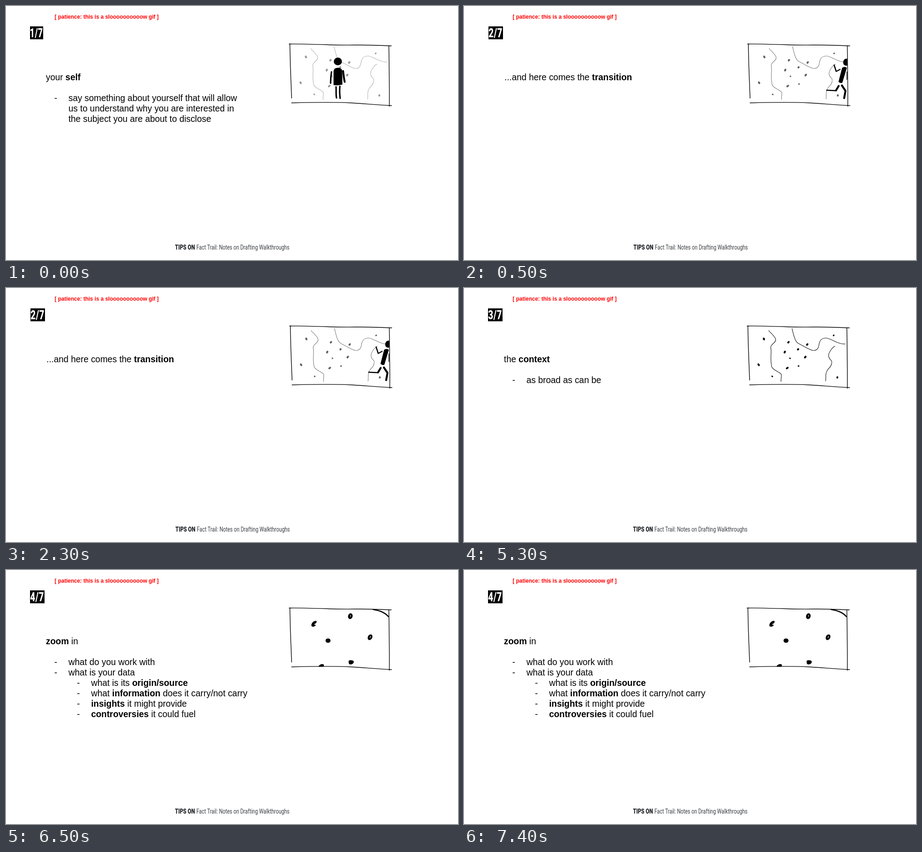
Recreate the animation shown at these times as an HTML page. Size 997 by 561 pixels, loop 8000 ms.

```html
<!DOCTYPE html>
<html lang="en">
<head>
<meta charset="utf-8">
<title>Presentation steps</title>
<style>
  html, body { margin: 0; width: 100%; height: 100%; overflow: hidden; background: #fff; }
  svg { display: block; width: 997px; height: 561px; }
  text { font: 19.4px "Liberation Sans", Arial, sans-serif; fill: #000; white-space: pre; }
  .b { font-weight: 700; }
  .note { font-size: 12px; font-weight: 700; fill: #f00; }
  .badge { font: 800 27.5px Roboto, sans-serif; letter-spacing: .8px; fill: #fff; }
  .foot { font: 400 15px Roboto, sans-serif; fill: #3a3e42; }
  .foot.b { font-weight: 800; fill: #1c2024; }
  .ink { fill: none; stroke: #000; stroke-width: 1.4; stroke-linecap: round; stroke-linejoin: round; }
  .w2 { stroke-width: 2.5; }
  .w3 { stroke-width: 3.2; }
  .w4 { stroke-width: 4.2; }
  .land { fill: none; stroke: var(--line); stroke-width: 1.2; stroke-linecap: round; stroke-linejoin: round; }
  .dots { fill: none; stroke: var(--dot); stroke-width: 4; stroke-linecap: round; }
  .dots .small { stroke-width: 3; }
  .slide { opacity: 0; animation: 8s step-end infinite; }
  #self { animation-name: self; --line: #b8b8b8; --dot: #979797; }
  #transition { animation-name: transition; --line: #858585; --dot: #606060; }
  #context { animation-name: context; --line: #222; --dot: #000; }
  #zoom { animation-name: zoom; }
  @keyframes self { 0% { opacity: 1 } 6.25%, 100% { opacity: 0 } }
  @keyframes transition { 0% { opacity: 0 } 6.25% { opacity: 1 } 43.75%, 100% { opacity: 0 } }
  @keyframes context { 0% { opacity: 0 } 43.75% { opacity: 1 } 81.25%, 100% { opacity: 0 } }
  @keyframes zoom { 0% { opacity: 0 } 81.25%, 100% { opacity: 1 } }
</style>
</head>
<body>
<svg viewBox="0 0 997 561">
  <defs>
    <g id="border" class="ink">
      <path d="M624 83.500C650 83 690 84.500 722 85.500S790 85 814 86.300L849.500 87.500"/>
      <path d="M625.800 83C626 125 628 160 629.500 203"/>
      <path d="M844 88C844.500 130 845.500 175 845 221"/>
      <path d="M629.500 213.500C670 212.500 730 212 760 213.500S810 217.500 850 219.500"/>
    </g>
    <g id="map">
      <g class="land">
        <path d="M672 93C672 97 676 97 678 100C682 106 688 109 687 115C685 122 676 124 676 131C679 142 674 150 678 173C682 183 697 184 699.500 191C700 197 698 201 699 206"/>
        <path d="M723 89C726 100 729 118 737 122C748 127 762 137 770 137.500C780 138 782 130 783 122C785 114 789 110 798 110C808 110 826 125 840 123"/>
        <path d="M817.500 128C810 132 802 145 804 151C806 160 812 157 810.500 166C808 177 804 175 800.500 182C795 191 799 198 797 205"/>
      </g>
      <g class="dots">
        <path d="M660.500 111l1 2M648.800 168l1.200 2M714.600 120l1.200-1.500M736 135.300l.8-.8M706.500 142l1-2M751.500 153l1.500-2M711.500 177l2-1.500M756 125l1.200-1.500M823 196.500v1"/>
        <path class="small" d="M679 194.500l.8.500M718.300 154.500l.5.500M737 172l.8-.2M814.500 104.500l.8-.6"/>
      </g>
    </g>
    <g id="footer">
      <text class="foot b" transform="translate(372.800 538) scale(.76 1)">TIPS ON</text>
      <text class="foot" transform="translate(420 538) scale(.73 1)">Fact Trail: Notes on Drafting Walkthroughs</text>
    </g>
  </defs>

  <rect width="997" height="561" fill="#fff"/>
  <text class="note" x="107.300" y="28">[ patience: this is a sloooooooooow gif ]</text>

  <g id="self" class="slide">
    <rect x="53" y="45" width="29" height="28.500"/>
    <text class="badge" transform="translate(52.600 69) scale(.66 1)">1/7</text>
    <text x="88" y="164">your <tspan class="b">self</tspan></text>
    <text x="106.400" y="210">-</text>
    <text x="137.700" y="210">say something about yourself that will allow</text>
    <text x="137.700" y="233">us to understand why you are interested in</text>
    <text x="137.700" y="256">the subject you are about to disclose</text>
    <g transform="translate(.5 .5)">
      <use href="#border"/><use href="#map"/>
      <ellipse cx="731.500" cy="122" rx="9" ry="8.500"/>
      <path d="M722 143Q723 136 731 136Q740 135 741 143L741.500 173Q731 176 722 174Z"/>
      <g class="ink">
        <path class="w3" d="M717.500 145C716 154 715.500 162 715.500 170"/>
        <path class="w4" d="M743 143C744 152 745 160 746.500 167"/>
        <path class="w3" d="M727.500 178C728 186 727 195 728.500 202.500M736 177C735 186 735.500 195 736.500 203.500"/>
      </g>
    </g>
    <use href="#footer"/>
  </g>

  <g id="transition" class="slide" transform="translate(1)">
    <rect x="53" y="45" width="32" height="28.500"/>
    <text class="badge" transform="translate(53.300 69) scale(.7 1)">2/7</text>
    <text x="88.300" y="164">...and here comes the <tspan class="b">transition</tspan></text>
    <g transform="translate(.5 .5)">
      <use href="#border"/><use href="#map"/>
      <path d="M844 116C838 115 834.500 120 835 125C835.500 130 839 132 844 131Z"/>
      <path d="M832.500 136Q838 132 843 136L833 169Q829 171 824.500 167Z"/>
      <path d="M824 171L832 173" stroke="#fff" stroke-width="4"/>
      <g class="ink">
        <path class="w2" d="M815 130L819.500 144L828 139.500"/>
        <path d="M843 145V162"/>
        <path class="w4" d="M825 176L819 186"/>
        <path class="w2" d="M819 186.500L798.500 185.500"/>
        <path class="w4" d="M832 175L840 187L837 203"/>
      </g>
    </g>
    <use href="#footer"/>
  </g>

  <g id="context" class="slide">
    <rect x="53" y="45" width="32" height="28.500"/>
    <text class="badge" transform="translate(53.300 69) scale(.7 1)">3/7</text>
    <text x="88" y="164">the <tspan class="b">context</tspan></text>
    <text x="106.400" y="210">-</text>
    <text x="137.700" y="210">as broad as can be</text>
    <g transform="translate(.5 .5)">
      <use href="#border"/><use href="#map"/>
    </g>
    <use href="#footer"/>
  </g>

  <g id="zoom" class="slide">
    <rect x="53" y="45" width="32" height="28.500"/>
    <text class="badge" transform="translate(53.300 69) scale(.7 1)">4/7</text>
    <text x="88" y="164"><tspan class="b">zoom</tspan> in</text>
    <text x="106.400" y="210">-</text>
    <text x="137.700" y="210">what do you work with</text>
    <text x="106.400" y="233">-</text>
    <text x="137.700" y="233">what is your data</text>
    <text x="156.600" y="256">-</text>
    <text x="187.700" y="256">what is its <tspan class="b">origin/source</tspan></text>
    <text x="156.600" y="279">-</text>
    <text x="187.700" y="279">what <tspan class="b">information</tspan> does it carry/not carry</text>
    <text x="156.600" y="302">-</text>
    <text x="187.700" y="302"><tspan class="b">insights</tspan> it might provide</text>
    <text x="156.600" y="325">-</text>
    <text x="187.700" y="325"><tspan class="b">controversies</tspan> it could fuel</text>
    <g transform="translate(.5 .5)">
      <use href="#border"/>
      <path class="ink w2" d="M809 86.500C822 89 834 92 843 102.500"/>
      <path d="M673 121C674 115 680 111 684 112C686 115 683 118 679 119C680 121 682 120 683 121C681 125 673 127 673 121Z"/>
      <ellipse cx="759" cy="101.500" rx="5" ry="6.500" transform="rotate(15 759 101.500)"/>
      <ellipse cx="759.500" cy="101" rx="1" ry="2" fill="#aaa"/>
      <ellipse cx="709.800" cy="155.500" rx="5.500" ry="4.800"/>
      <ellipse cx="802.500" cy="148" rx="4.800" ry="6.500" transform="rotate(30 802.500 148)"/>
      <ellipse cx="803" cy="147.500" rx=".9" ry="2.500" fill="#bbb" transform="rotate(30 803 147.500)"/>
      <path d="M688.500 213C691 208 696 206 700 208Q701.500 210 699.500 213Z"/>
      <path d="M755.500 200C758 198 764 198.500 766.500 201C767 206 763 208.500 758 208C755 207 755 203 755.500 200Z"/>
    </g>
    <use href="#footer"/>
  </g>
</svg>
</body>
</html>
```
